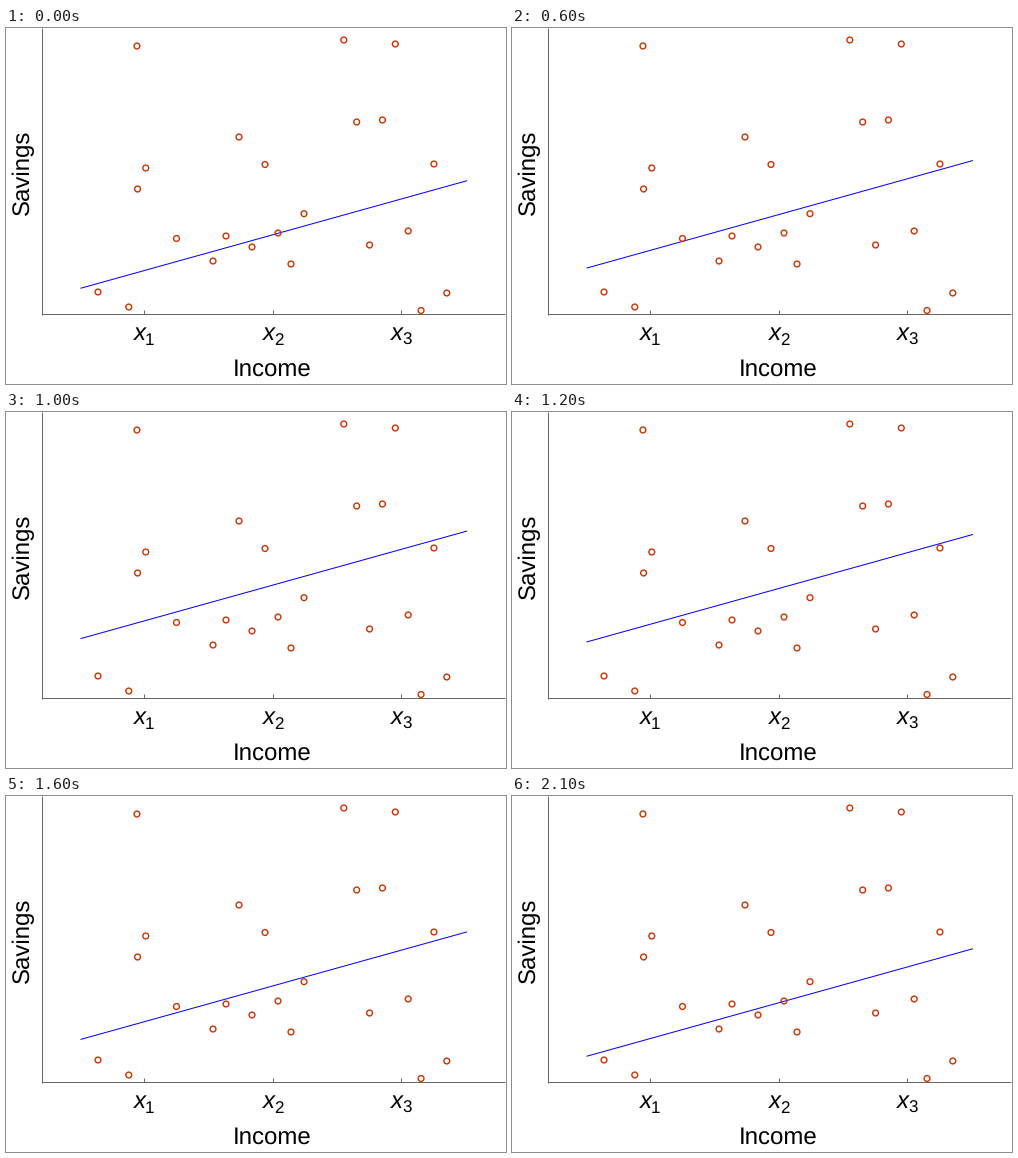
These frames come from a looping animation (500 px wide and 356 px high, 2200 ms). A matplotlib script:

```python
import matplotlib.pyplot as plt
import numpy as np
from matplotlib.animation import FuncAnimation
from matplotlib.patches import Circle

W, H, DPI = 500, 356, 100
FRAMES, INTERVAL = 22, 100
PX = 72 / DPI  # one pixel in points

AXIS, DOT, LINE = "#666666", "#cc3300", "#0000ff"
FONT = "Liberation Sans"

# Regression line: end points at rest, and its rise per step
X0, X1 = 74.5, 461
Y0, Y1 = 260.3, 152.7
RISE = 3.365

plt.rcParams["text.hinting"] = "none"
fig = plt.figure(figsize=(W / DPI, H / DPI), dpi=DPI, facecolor="white")
ax = fig.add_axes([0, 0, 1, 1])
ax.set_xlim(0, W)
ax.set_ylim(H, 0)
ax.axis("off")


def stroke(xs, ys, color, z=1):
    return ax.plot(xs, ys, color=color, lw=PX, zorder=z,
                   solid_capstyle="butt")[0]


def label(x, y, text, size=24, **kw):
    ax.text(x, y, text, fontsize=size * PX, family=FONT, color="black",
            va="baseline", ha="left", **kw)


def cluster(left, right, heights, bend=1):
    """Dots spread from left to right; a larger bend crowds the middle."""
    u = np.linspace(-1, 1, len(heights))
    spread = np.sign(u) * np.abs(u) ** bend
    xs = (left + right) / 2 + (right - left) / 2 * spread
    for p in zip(xs, heights):
        ax.add_patch(Circle(p, 2.9, fill=False, ec=DOT, lw=1.4 * PX, zorder=3))


stroke([36, 36], [0, 287], AXIS)
stroke([36, 499], [286, 286], AXIS)
for i in range(3):
    x = 138 + 128.6 * i
    stroke([x, x], [282, 286], AXIS)
    label(x - 9.8, 312, "x", style="italic")
    label(x + 1.2, 317, str(i + 1), 17)

label(226.9, 348, "Income")
label(23, 187, "Savings", rotation=90, rotation_mode="anchor")

cluster(92, 170.5, [264, 279, 18, 161, 140, 210.5], bend=3)
cluster(207, 298, [233, 208, 109, 219, 136.5, 205, 236, 185.7])
cluster(337.8, 440.8, [12, 94, 217, 92, 16, 203, 282.5, 136, 265])

line = stroke([X0, X1], [Y0, Y1], LINE, z=2)


def update(frame):
    # up for half the loop, then back down, resting one step at each end
    rise = RISE * min(frame, FRAMES - 1 - frame)
    line.set_ydata([Y0 - rise, Y1 - rise])
    return line,


anim = FuncAnimation(fig, update, frames=FRAMES, interval=INTERVAL,
                     repeat=True, repeat_delay=0, blit=False)
plt.show()
```
